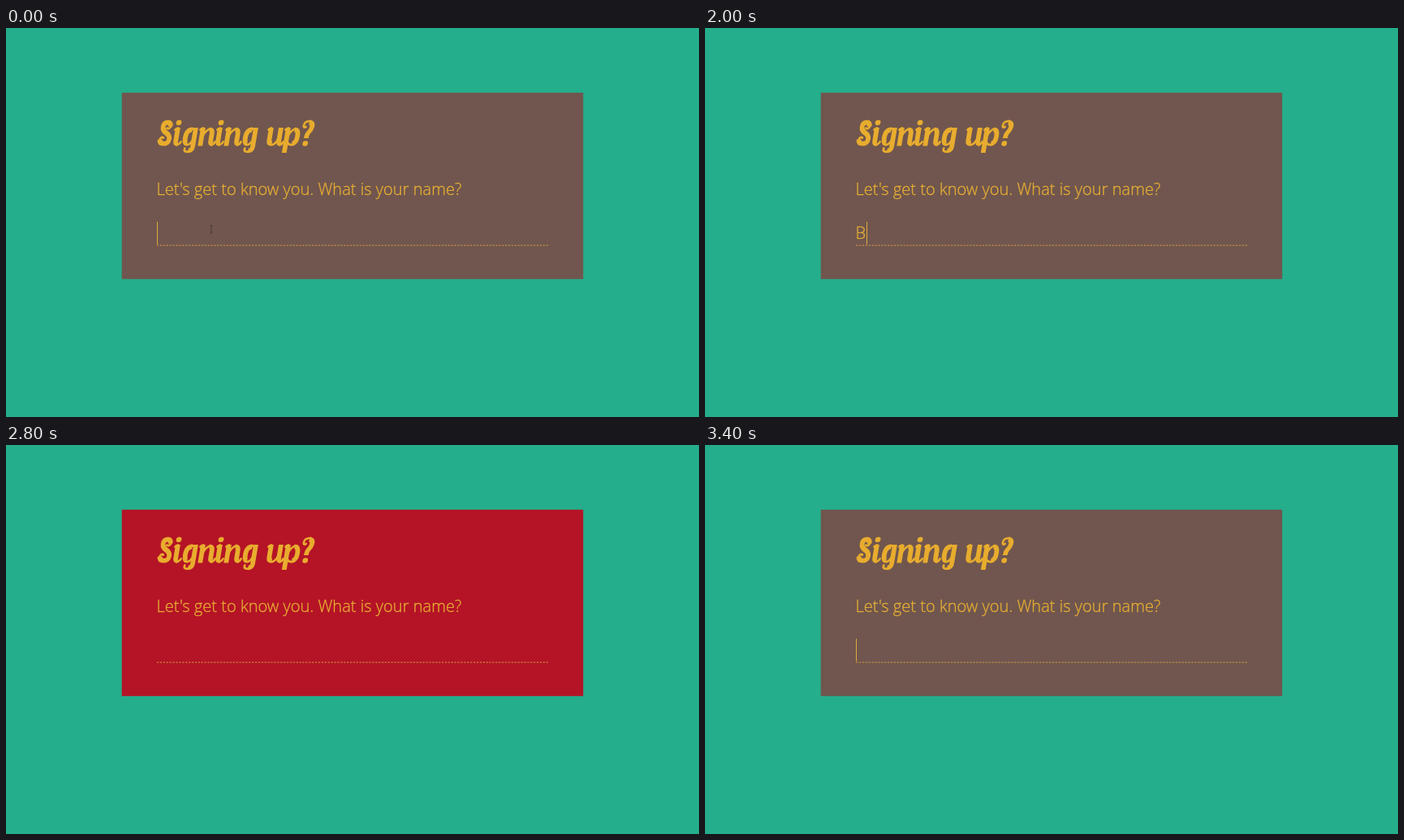
Recreate the animation shown at these times as an HTML page. Size 854 px wide and 480 px high, loop 3500 ms.

```html
<!DOCTYPE html>
<html lang="en">
<head>
<meta charset="utf-8">
<title>Sign-up form</title>
<style>
  html, body { margin: 0; width: 100%; height: 100%; overflow: hidden; background: #24ae8c; }
  svg { display: block; width: 854px; height: 480px; }
  text { font-family: "Open Sans", "Noto Sans", sans-serif; font-weight: 300; fill: #e8af33; stroke: #e8af33; stroke-width: .3; }
  #title { fill: none; stroke: #e8ac2e; stroke-width: 5.8; stroke-linejoin: round; }
  .thin { stroke-width: 2.8; stroke-linecap: round; }
  .dot { stroke-width: 6.6; stroke-linecap: round; }
</style>
</head>
<body>
<svg viewBox="0 0 854 480">
  <rect width="854" height="480" fill="#24ae8c"/>
  <rect id="card" x="142.700" y="79.800" width="568.600" height="230"/>
  <g id="title" role="img" aria-label="Signing up?"></g>
  <text id="prompt" x="185.5" y="206">Let's get to know you. What is your name?</text>
  <text id="entry" x="185.5" y="260"></text>
  <path d="M186 268.2H669" stroke="#d29c40" stroke-dasharray="2.3 1.6" stroke-width="1"/>
  <path id="caret" d="M.5 239V267" stroke="#deaa3c" stroke-width="1"/>
  <path id="pointer" d="M251.5 243.5q1.5 0 1.5 1.5q0-1.5 1.5-1.5M253 245v7M251.5 253q1.5 0 1.5-1.5q0 1.5 1.5 1.5"
    fill="none" stroke="#473d39" stroke-width=".9"/>
</svg>
<script>
const LOOP = 3500, FRAME = 100, BLINK = 500;
const NAME = "Bef";
const BROWN = [112, 86, 78], RED = [189, 11, 32];
// [time, letters entered]
const KEYS = [[200, 1], [400, 2], [600, 3], [1900, 2], [2000, 1], [2100, 0]];
const $ = id => document.getElementById(id);

// Script letters, upright with the baseline at 0: [heavy, thin, dot]
const GLYPHS = {
  S: ["M13.500-24Q13-29 9.500-29Q4.500-29 4.500-24Q4.500-19 9.500-16Q14.500-13 14.500-8.500Q14.500-2.800 8.500-2.800Q3.500-2.800 3-8", "M3-8Q4-12 7-10M14-24Q12-20 9.500-22", ""],
  i: ["M4-22.500V-6Q4-2.700 7-2.700", "M1-20L4-22M6-1.500Q9-1.800 10.500-5", "M4-28.800h.1"],
  g: ["M16-22.500V1Q16 6 11 5.800M12-20Q5-20 5-10Q5-2.900 8.500-2.900", "M10-21.200Q14-21.500 16-19.500M8.500-1.400Q12.500-1.500 15-8M11 7.200Q5.500 7.500 6.500 3", ""],
  n: ["M4-22.500V0M12-19.800Q16-20.500 16-15V-6Q16-2.700 19-2.700", "M1-20L4-22M5-12Q8-19.500 12.500-21M18-1.500Q20.500-1.800 21.500-5", ""],
  u: ["M4-22.500V-7Q4-2.800 8-2.800M16-22.500V-6Q16-2.700 19-2.700", "M1-20L4-22M8-1.400Q12-1.500 15-9M18-1.500Q20.500-1.800 21.500-5", ""],
  p: ["M4-22.500V8.500M12-19.800Q17-20.500 17-12Q17-3 11.500-2.900", "M1-20L4-22M5-12Q8-19.500 12.500-21M12-1.400Q8-1 6-4", ""],
  "?": ["M8-29.200Q12.500-28.500 12-23.500Q11.500-19 8.500-16Q7-14 7-9.500", "M9-30.700Q1.500-31 1.500-25Q2-22 4.500-23.500", "M7-3h.1"]
};

function drawTitle() {
  const starts = [186, 205, 215, 236, 257, 268, 289, 0, 320, 341, 362];
  $("title").innerHTML = [..."Signing up?"].map((letter, i) => {
    if (letter === " ") return "";
    const [heavy, thin, dot] = GLYPHS[letter];
    return `<g transform="translate(${starts[i] - .8} 145.500) skewX(-9.500)">
      <path d="${heavy}"/><path class="thin" d="${thin}"/><path class="dot" d="${dot}"/></g>`;
  }).join("");
}

// Choose one type size from the width of the prompt line.
function setTypeSize() {
  const prompt = $("prompt");
  prompt.style.fontSize = "20px";
  const size = 20 * 376 / prompt.getComputedTextLength();
  prompt.style.fontSize = $("entry").style.fontSize = size + "px";
}

const easeOut = p => 1 - (1 - Math.min(1, Math.max(0, p))) ** 2.3;
const fade = (t, start) => easeOut((t - start) / 300);

function draw(t) {
  const [pressed, count] = KEYS.filter(key => key[0] <= t).pop() || [0, 0];
  const entry = $("entry");
  entry.textContent = NAME.slice(0, count);

  const caretX = 186 + (count ? Math.round(entry.getComputedTextLength()) : 0);
  const caretOn = Math.floor((t - pressed) / BLINK) % 2 === 0;
  $("caret").setAttribute("transform", `translate(${caretX} 0)`);
  $("caret").setAttribute("visibility", caretOn ? "visible" : "hidden");
  $("pointer").setAttribute("visibility", pressed ? "hidden" : "visible");

  const error = fade(t, 2620) - fade(t, 3080);
  const color = BROWN.map((c, i) => Math.round(c + (RED[i] - c) * error));
  $("card").setAttribute("fill", `rgb(${color})`);
}

drawTitle();
setTypeSize();
draw(0);
const began = performance.now();
function tick() {
  const t = (performance.now() - began) % LOOP;
  draw(Math.floor(t / FRAME) * FRAME);
  requestAnimationFrame(tick);
}
requestAnimationFrame(tick);
</script>
</body>
</html>
```
